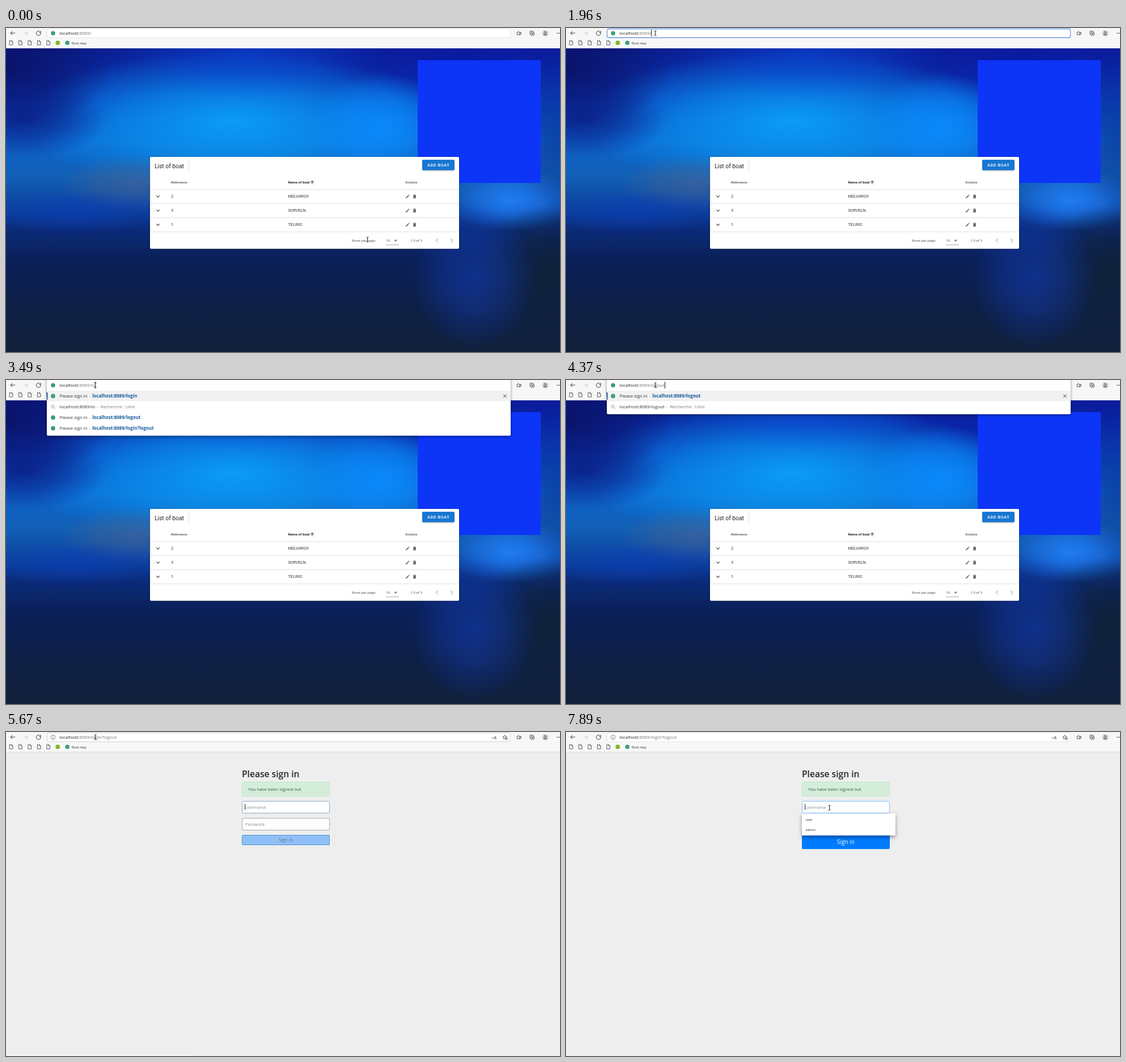
An HTML page with a canvas that plays this animation: 977 px wide and 573 px high, repeating every 7.99 s.

```html
<!DOCTYPE html>
<html lang="en">
<head>
<meta charset="utf-8">
<title>Boat list sign out</title>
<style>
html, body { margin: 0; width: 100%; height: 100%; overflow: hidden; background: #eee; }
canvas { display: block; width: 977px; height: 573px; }
</style>
</head>
<body>
<canvas id="stage" width="977" height="573"></canvas>
<script>
const W = 977, H = 573, LOOP = 7990;
const c = document.getElementById('stage').getContext('2d');
const SANS = '"Open Sans", "Noto Sans", sans-serif';
const ROBOTO = 'Roboto, Arial, sans-serif';
const HOST = 'localhost', PORT = ':8089/';

function text(s, x, y, size, color, weight = 400, family = SANS, align = 'left') {
  c.font = `${weight} ${size}px ${family}`;
  c.fillStyle = color;
  c.textAlign = align;
  c.textBaseline = 'alphabetic';
  c.fillText(s, x, y);
  return x + c.measureText(s).width;
}
const label = (s, x, y, size, color, weight) => text(s, x, y, size, color, weight, ROBOTO);

function rect(x, y, w, h, color) {
  c.fillStyle = color;
  c.fillRect(x, y, w, h);
}

function box(x, y, w, h, r, fill, stroke, lw = 1) {
  c.beginPath();
  c.roundRect(x, y, w, h, r);
  if (fill) { c.fillStyle = fill; c.fill(); }
  if (stroke) { c.strokeStyle = stroke; c.lineWidth = lw; c.stroke(); }
}

function shadowBox(x, y, w, h, r, blur, dy, alpha) {
  c.save();
  c.shadowColor = `rgba(0,0,0,${alpha})`;
  c.shadowBlur = blur;
  c.shadowOffsetY = dy;
  box(x, y, w, h, r, '#fff');
  c.restore();
}

function line(color, lw, ...p) {
  c.beginPath();
  for (let i = 0; i < p.length; i += 2) c.lineTo(p[i], p[i + 1]);
  c.strokeStyle = color;
  c.lineWidth = lw;
  c.stroke();
}

function poly(color, ...p) {
  c.beginPath();
  for (let i = 0; i < p.length; i += 2) c.lineTo(p[i], p[i + 1]);
  c.closePath();
  c.fillStyle = color;
  c.fill();
}

function disc(x, y, r, fill, stroke, lw = 1, from = 0, to = Math.PI * 2) {
  c.beginPath();
  c.arc(x, y, r, from, to);
  if (fill) { c.fillStyle = fill; c.fill(); }
  if (stroke) { c.strokeStyle = stroke; c.lineWidth = lw; c.stroke(); }
}

function blob(x, y, rx, ry, rgb, alpha) {
  c.save();
  c.translate(x, y);
  c.scale(rx, ry);
  const g = c.createRadialGradient(0, 0, 0, 0, 0, 1);
  g.addColorStop(0, `rgba(${rgb},${alpha})`);
  g.addColorStop(.5, `rgba(${rgb},${alpha * .6})`);
  g.addColorStop(1, `rgba(${rgb},0)`);
  rect(-1, -1, 2, 2, g);
  c.restore();
}

function wallpaper() {
  const g = c.createLinearGradient(0, 36, 0, H);
  [[0, '#0a1e92'], [.16, '#0a38b4'], [.3, '#0c62cc'], [.42, '#1260b6'], [.53, '#0b409c'],
   [.6, '#0a2a78'], [.7, '#0b1f58'], [.85, '#0e1f46'], [1, '#10203a']].forEach(s => g.addColorStop(...s));
  rect(0, 36, W, H - 36, g);
  c.save();
  c.beginPath();
  c.rect(0, 36, W, H - 36);
  c.clip();
  blob(400, 165, 380, 125, '10,160,250', .95);
  blob(430, 45, 240, 80, '10,70,220', .6);
  blob(0, 70, 190, 110, '10,16,100', .9);
  blob(30, 160, 150, 70, '10,28,130', .8);
  blob(800, 50, 260, 80, '10,22,170', .6);
  blob(665, 175, 130, 95, '10,140,255', .9);
  blob(225, 275, 130, 50, '66,98,150', .7);
  blob(120, 325, 170, 38, '14,62,190', .5);
  blob(890, 305, 120, 55, '34,130,250', .9);
  blob(977, 200, 90, 120, '10,40,130', .5);
  blob(977, 430, 170, 120, '16,34,54', .9);
  blob(825, 440, 110, 130, '18,62,180', .6);
  c.restore();
  rect(726, 57, 217, 217, '#0d35f8');
}

function chevron(x, y, dx, dy, color) {
  if (dy) line(color, 1.1, x - 2.8, y - 1.4, x, y + 1.4, x + 2.8, y - 1.4);
  else line(color, 1.1, x - dx * 1.6, y - 3, x + dx * 1.6, y, x - dx * 1.6, y + 3);
}

function rowIcons(y) {
  const k = '#666';
  chevron(268, y, 0, 1, '#444');
  line(k, 1.8, 705.8, y + 2.6, 709.6, y - 1.2);
  line(k, 1.8, 710.2, y - 1.8, 711.2, y - 2.8);
  poly(k, 704.8, y + 3.5, 705, y + 1.8, 706.6, y + 3.4);
  rect(718.4, y - 1.8, 4.4, 5.2, k);
  rect(717.9, y - 3, 5.4, .8, k);
  rect(719.6, y - 3.5, 2, .6, k);
}

function boatPage() {
  wallpaper();
  shadowBox(254, 228, 545, 162.5, 2, 3, 1, .35);
  label('List of boat', 262, 248, 10.3, '#222');
  rect(322, 234, 1, 20, '#e2e2e2');
  c.save();
  c.shadowColor = 'rgba(0,0,0,.3)';
  c.shadowBlur = 2;
  c.shadowOffsetY = 1;
  box(734, 233, 57, 18.6, 2, '#1976d2');
  c.restore();
  c.letterSpacing = '0.62px';
  label('ADD BOAT', 743, 245, 7.25, '#fff', 500);
  c.letterSpacing = '0px';

  label('Reference', 291, 275, 6.25, '#666', 700);
  label('Name of boat', 497.5, 275, 6.25, '#222', 700);
  label('Actions', 704, 275, 6.25, '#666', 700);
  line('#222', 1, 540, 276.3, 540, 270.4);
  line('#222', 1, 537.2, 273, 540, 270.2, 542.8, 273);

  [['2', 'MELVAROX'], ['3', 'SORVELN'], ['1', 'TELIRIC']].forEach(([ref, name], i) => {
    const y = 297.8 + i * 25;
    rect(254, 285 + i * 25, 545, 1, '#e2e2e2');
    label(ref, 291, y + 2.4, 7.2, '#333');
    label(name, 497.5, y + 2.4, 7.2, '#333');
    rowIcons(y);
  });
  rect(254, 360, 545, 1, '#e2e2e2');

  label('Rows per page:', 610, 378, 6.22, '#555');
  label('10', 670, 378, 6.22, '#555');
  poly('#555', 684.5, 374.8, 689.7, 374.8, 687.1, 377.4);
  rect(670, 383, 23, 1, '#aaa');
  label('1-3 of 3', 713, 378, 6.22, '#555');
  chevron(760, 375.8, -1, 0, '#aaa');
  chevron(786, 375.8, 1, 0, '#aaa');
}

function signInPage(t) {
  const settled = t >= 5780;
  rect(0, 36, W, H - 36, '#eee');
  text('Please sign in', 416, 80.3, 15.6, '#212529', 600);
  box(416.5, 88.5, 154, 25, 2, '#d4edda', '#c3e6cb');
  text('You have been signed out', 427, 103.8, 7.8, '#35593f');
  box(416.5, 122.5, 154, 21, 2, '#fff', settled ? '#80bdff' : '#8aa9c4');
  text('Username', 421.8, 135.8, 7.6, '#858b90');
  box(416.5, 152.5, 154, 21, 2, '#fff', settled ? '#ced4da' : '#a4a7aa');
  text('Password', 421.8, 165.8, 7.6, '#858b90');
  if (settled) {
    box(416, 182, 155, 25, 2.5, '#007bff');
    text('Sign in', 493.5, 198.4, 10, '#fff', 400, SANS, 'center');
  } else {
    box(416.5, 182.5, 154, 17, 1.5, '#8fc0f7', '#4f93dc');
    text('Sign in', 493.5, 193.8, 8.1, '#667889', 400, SANS, 'center');
  }
  if (Math.floor((t - 5670) / 525) % 2 === 0) rect(421, 127, 1, 11, '#333');
  if (t >= 7330) {
    shadowBox(416, 144, 165, 39, 1, 7, 3, .4);
    text('user', 422.3, 157.3, 6.05, '#222');
    text('admin', 422.3, 174.8, 6.05, '#222');
  }
  if (!settled) rect(0, 571, 327, 2, '#f7f7f7');
}

function docIcon(x) {
  const y = 26;
  c.beginPath();
  [[-2.8, -3.8], [.6, -3.8], [2.9, -1.4], [2.9, 3.8], [-2.8, 3.8]].forEach(p => c.lineTo(x + p[0], y + p[1]));
  c.closePath();
  c.fillStyle = '#fff';
  c.fill();
  c.strokeStyle = '#444';
  c.lineWidth = .9;
  c.stroke();
  line('#444', .8, x + .5, y - 3.6, x + .5, y - 1.2, x + 2.8, y - 1.2);
}

function star(x, y, r) {
  c.beginPath();
  for (let i = 0; i < 10; i++) {
    const a = -Math.PI / 2 + i * Math.PI / 5, q = i % 2 ? r * .48 : r;
    c.lineTo(x + q * Math.cos(a), y + q * Math.sin(a));
  }
  c.closePath();
  c.strokeStyle = '#444';
  c.lineWidth = .8;
  c.stroke();
}

function cross(x, y, r) {
  line('#333', 1, x - r, y - r, x + r, y + r);
  line('#333', 1, x + r, y - r, x - r, y + r);
}

const badge = (x, y) => disc(x, y, 3.8, '#3d9c80');

function toolbar(t) {
  rect(0, 0, W, 36, '#f7f7f7');
  rect(0, 35, W, 1, t >= 5670 ? '#dedede' : '#f0f0f0');
  line('#333', 1, 16, 9, 8, 9);
  line('#333', 1, 11.4, 5.6, 8, 9, 11.4, 12.4);
  line('#ccc', 1, 30.5, 9, 38.5, 9);
  line('#ccc', 1, 35.1, 5.6, 38.5, 9, 35.1, 12.4);
  if (t >= 5120 && t < 5670) cross(57.3, 9.2, 3);
  else {
    disc(57.3, 9.3, 3.8, null, '#333', 1, -.3, Math.PI * 1.68);
    line('#333', 1, 61.2, 5, 61.2, 7.8, 58.3, 7.8);
  }
  [9, 25.3, 41.8, 58.2, 74.7].forEach(docIcon);
  disc(91.3, 26.3, 4, '#80b82e');
  badge(108.2, 26.2);
  text('Boat App', 116, 28.5, 6.07, '#333');

  star(903.6, 9.4, 3.8);
  [7.8, 9.6, 11.4].forEach(y => line('#444', .8, 906, y, 909, y));
  box(923.8, 5.3, 5.6, 5.6, 1, null, '#444', .9);
  box(925.8, 7.4, 5.6, 5.6, 1, '#f7f7f7', '#444', .9);
  line('#444', .8, 926.8, 10.2, 930.4, 10.2);
  line('#444', .8, 928.6, 8.4, 928.6, 12);
  disc(951, 9.3, 5.4, '#c9c7c5');
  disc(951, 7.6, 2, '#8b8886');
  disc(951, 13, 3.3, '#8b8886', null, 1, Math.PI, 0);
  [971.8, 974, 976.2].forEach(x => disc(x, 9.3, .75, '#333'));
}

function suggestions(t) {
  const rows = t < 4370
    ? [['Please sign in', 'login'], ['', 'lo'], ['Please sign in', 'logout'], ['Please sign in', 'login?logout']]
    : [['Please sign in', 'logout'], ['', 'logout']];
  shadowBox(72, -6, 818, 28.5 + rows.length * 19, 2, 5, 2, .4);
  rect(72, 19, 818, 18.5, '#f1f1f1');
  rect(72, 22, 1.5, 13, '#1a5fb0');
  rows.forEach(([title, tail], i) => {
    const y = 28.4 + i * 19, url = HOST + PORT + tail;
    if (title) {
      badge(83, y);
      const x = text(title, 94.6, y + 2.8, 7.8, '#333');
      text('-', x + 3, y + 2.8, 7.8, '#777');
      text(url, x + 8.5, y + 2.8, 7.95, '#1a5c9e', 700);
    } else {
      disc(82.4, y - .6, 2.6, null, '#888', .8);
      line('#888', .8, 84.3, y + 1.3, 86.6, y + 3.6);
      const x = text(url, 94.6, y + 2.8, 7.85, '#333');
      text('-  Recherche : Ulmi', x + 3.2, y + 2.8, 7.8, '#777');
    }
  });
  cross(879.8, 28.4, 2.8);
}

function addressBar(t, hover) {
  const focus = t >= 1410 && t < 3390, listed = t >= 3390 && t < 5120;
  const selected = t >= 1410 && t < 1960;
  const tail = t < 3390 ? '' : t < 3490 ? 'l' : t < 4370 ? 'lo' : t < 5570 ? 'logout' : 'login?logout';
  if (listed) suggestions(t);
  else box(72.5, 1.5, 817, 15.5, 3, '#fff', focus ? '#6d9be0' : hover ? '#d0d0d0' : '#e6e6e6', focus ? 1.3 : 1);

  if (t < 5570) badge(83, 9.2);
  else {
    disc(83, 9.3, 3.9, null, '#666', .8);
    rect(82.6, 8.6, .9, 3, '#666');
    rect(82.6, 6.9, .9, .9, '#666');
    star(879.5, 9.2, 3.8);
    disc(882.4, 11.6, 2.2, '#fff', '#444', .7);
    line('#444', .7, 881.2, 11.6, 883.6, 11.6);
    line('#444', .7, 882.4, 10.4, 882.4, 12.8);
  }
  if (t >= 5670) text('aあ', 856.8, 11.6, 5.8, '#444', 400, '"Open Sans", "Noto Sans CJK JP", sans-serif');

  if (selected) rect(94, 3, 56.5, 13, '#0f6cd0');
  const mid = text(HOST, 94.6, 12.3, 7.85, selected ? '#fff' : '#222');
  const end = text(PORT + tail, mid, 12.3, 7.85, selected ? '#fff' : '#777');
  const caret = t >= 1960 && t < 5120 && !(t >= 2510 && t < 2940) && !(t >= 4900);
  if (caret) rect(Math.round(end), 3, 1, 12, '#222');
}

// start, end, step count, target x, target y
const moves = [
  [100, 850, 8, 176, 11],
  [970, 1220, 3, 158, 9],
  [6120, 6880, 8, 472, 155],
  [7000, 7220, 3, 469, 134],
  [7770, 7890, 2, 465, 134]
];

function pointer(t) {
  let x = 638, y = 374;
  for (const [a, b, n, tx, ty] of moves) {
    if (t < a) break;
    const k = Math.min(1, (Math.floor((t - a) / (b - a) * (n - 1) + 1e-6) + 1) / n);
    const e = k * k * (3 - 2 * k);
    x += (tx - x) * e;
    y += (ty - y) * e;
  }
  return [x, y];
}

function drawPointer(x, y, t) {
  const inBar = y < 18 && x > 94 && x < 890;
  const inForm = t >= 5670 && x > 416 && x < 571 && y > 122 && y < 174;
  if (inBar || inForm || t < 100) {
    x = Math.round(x) - .5;
    line('#222', 1, x, y - 3.5, x, y + 3.5);
    line('#222', .9, x - 2.2, y - 4, x + 2.2, y - 4);
    line('#222', .9, x - 2.2, y + 4, x + 2.2, y + 4);
    return;
  }
  c.save();
  c.translate(x, y);
  c.beginPath();
  [[0, 0], [0, 8.8], [2, 7], [3.4, 10], [4.7, 9.4], [3.4, 6.5], [6.2, 6.3]].forEach(p => c.lineTo(...p));
  c.closePath();
  c.fillStyle = '#fff';
  c.fill();
  c.strokeStyle = '#111';
  c.lineWidth = .7;
  c.stroke();
  c.restore();
}

function draw(t) {
  const [x, y] = pointer(t);
  c.clearRect(0, 0, W, H);
  if (t < 5670) boatPage();
  else signInPage(t);
  if (t >= 5240 && t < 5670) box(-3, 571, 330, 6, 2, '#f7f7f7');
  toolbar(t);
  addressBar(t, y < 18);
  drawPointer(x, y, t);
}

const start = performance.now();
function frame() {
  draw((performance.now() - start) % LOOP);
  requestAnimationFrame(frame);
}
frame();
</script>
</body>
</html>
```
